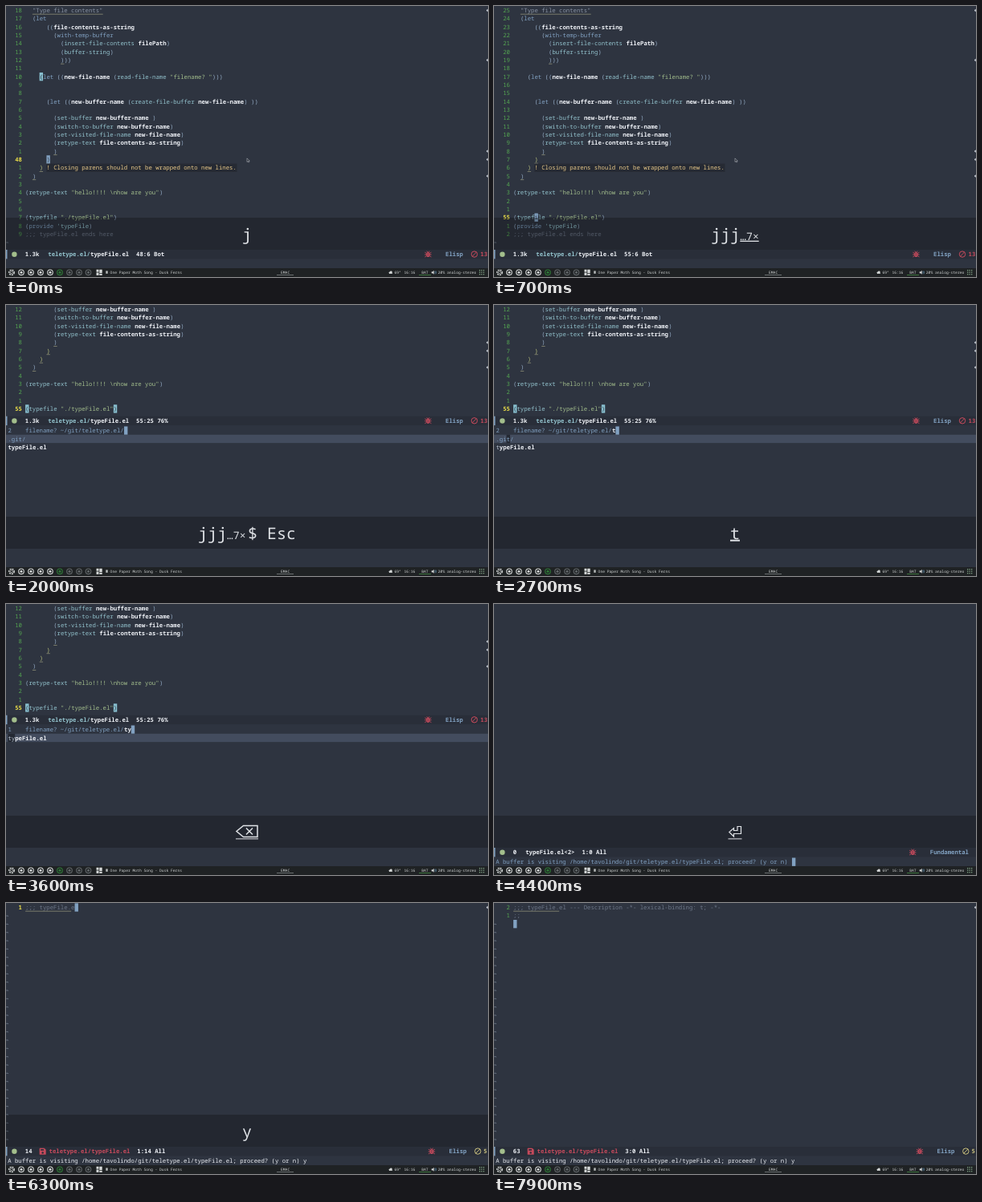
An HTML page that plays this animation: 600x338 px, repeating every 8000 ms.

```html
<!DOCTYPE html>
<html lang="en">
<head>
<meta charset="utf-8">
<title>Retyping a file in the editor</title>
<style>
html, body { margin: 0; width: 100%; height: 100%; overflow: hidden; background: #2e3440; }
svg { display: block; width: 600px; height: 338px; }
text { font-family: "Noto Sans Mono", "DejaVu Sans Mono", monospace; white-space: pre; text-rendering: geometricPrecision; }
</style>
</head>
<body>
<svg id="stage" viewBox="0 0 600 338" xmlns="http://www.w3.org/2000/svg"></svg>
<script>
const LOOP = 8000, CW = 4.39, LH = 10.33, X0 = 24.1, FS = CW / 0.6, ECHO = 321.7;
const C = {
  bg: '#2e3440', bar: '#292e39', blue: '#81a1c1', teal: '#93c3cd', white: '#eceff4',
  green: '#a3be8c', red: '#c64a5c', dim: '#6d7788', num: '#54a551', now: '#e8dc48',
  warn: '#ebcb8b', match: '#88c0d0', sel: '#434c5e', dark: '#242933', line: '#98987c'
};

const CODE = [
  '  "Type file contents"',
  '  (let',
  '      ((file-contents-as-string',
  '        (with-temp-buffer',
  '          (insert-file-contents filePath)',
  '          (buffer-string)',
  '          )))',
  '',
  '    (let ((new-file-name (read-file-name "filename? ")))',
  '', '',
  '      (let ((new-buffer-name (create-file-buffer new-file-name) ))',
  '',
  '        (set-buffer new-buffer-name )',
  '        (switch-to-buffer new-buffer-name)',
  '        (set-visited-file-name new-file-name)',
  '        (retype-text file-contents-as-string)',
  '        )',
  '      )',
  '    )',
  '  )',
  '',
  '(retype-text "hello!!!! \\nhow are you")',
  '', '',
  '(typefile "./typeFile.el")',
  "(provide 'typeFile)",
  ';;; typeFile.el ends here'
];
const FIRST = 30;
const LOOSE = [6, 17, 18, 19, 20];
const FLAGGED = [0, 6, 17, 18, 20];
const HEAD = ';;; typeFile.el --- Description -*- lexical-binding: t; -*-\n;;\n';
const DIR = 'teletype.el/', FILE = 'typeFile.el';
const ASK = 'A buffer is visiting /home/tavolindo/git/teletype.el/typeFile.el; proceed? (y or n) ';

const esc = s => String(s).replace(/&/g, '&amp;').replace(/</g, '&lt;').replace(/>/g, '&gt;');
const rect = (x, y, w, h, fill) => `<rect x="${x}" y="${y}" width="${w}" height="${h}" fill="${fill}"/>`;
const path = (d, stroke, w = 1, fill = 'none') =>
  `<path d="${d}" stroke="${stroke}" stroke-width="${w}" fill="${fill}"/>`;
const ring = (x, y, r, stroke, w = 1, extra = '') =>
  `<circle cx="${x}" cy="${y}" r="${r}" fill="none" stroke="${stroke}" stroke-width="${w}" ${extra}/>`;
const dot = (x, y, r, fill) => `<circle cx="${x}" cy="${y}" r="${r}" fill="${fill}"/>`;
// y is the vertical middle of the row
const text = (x, y, s, fill, weight = 500, size = FS) =>
  `<text x="${x}" y="${y + size * 0.355}" font-size="${size}" font-weight="${weight}" fill="${fill}">${esc(s)}</text>`;
const rowY = r => 5.5 + LH * r;
const colX = c => X0 + CW * c;
const cell = (x, y, fill, n = 1) => rect(x, y - LH / 2, CW * n, LH, fill);
const under = (x, y, n) => rect(x, y + 4.3, CW * n, 0.7, C.line);
const number = (r, n, current) => {
  const s = String(n);
  return text(20 - CW * s.length, rowY(r), s, current ? C.now : C.num, current ? 700 : 500);
};
const block = (x, y, ch, fill) => cell(x, y, fill) + (ch ? text(x, y, ch, C.bg) : '');
const edge = y => path(`M599.6 ${y - 1.4}l-1.6 1.4l1.6 1.4z`, '#dfe3ea', 0.4, '#dfe3ea');
const tilde = r => path(`M0.3 ${rowY(r) + 0.4}q.7-.9 1.4-.2t1.3-.2`, '#7d8a9a', 0.8);

function codeLine(i, y) {
  const s = CODE[i];
  if (i === 0) return text(colX(2), y, s.trim(), '#8993a3') + under(colX(2), y, 20);
  if (s[0] === ';') return text(X0, y, s, C.dim);
  let out = '', prev = '';
  for (const m of s.matchAll(/"[^"]*"|\(+|\)+|[^\s()"]+/g)) {
    const w = m[0];
    let fill = C.white, weight = 700;
    if (w[0] === '"') [fill, weight] = [C.green, 500];
    else if ('()'.includes(w[0])) [fill, weight] = [i === 18 || i === 19 ? '#b5bd7c' : '#92a9c2', 500];
    else if (/^(let|with-temp-buffer|provide)$/.test(w)) [fill, weight] = [C.blue, 500];
    else if (prev === '(' || w[0] === "'") [fill, weight] = [C.teal, 500];
    out += text(colX(m.index), y, w, fill, weight);
    prev = w;
  }
  if (LOOSE.includes(i)) out += under(colX(s.indexOf(')')), y, 1);
  return out;
}

function codeView(top, line, col, cursor) {
  let out = '';
  const cur = line - FIRST;
  const mate = { 18: [8, 4], 19: [1, 2], 25: col === 25 ? [25, 0] : null }[cur];
  for (let i = top; i < (cursor ? CODE.length : 26); i++) {
    const r = i - top, y = rowY(r);
    out += number(r, i === cur ? line : Math.abs(i - cur), i === cur) + codeLine(i, y);
    if (FLAGGED.includes(i)) out += edge(y);
  }
  if (cursor) out += tilde(CODE.length);
  if (mate) out += block(colX(mate[1]), rowY(mate[0] - top), '(', C.match);
  return out + block(colX(col), rowY(cur - top), CODE[cur][col], cursor ? C.blue : C.match);
}

const bug = (x, y) =>
  `<ellipse cx="${x}" cy="${y + 0.4}" rx="2.3" ry="3.1" fill="${C.red}"/>` +
  path(`M${x - 4} ${y - 2.4}l2 1.2M${x + 4} ${y - 2.4}l-2 1.2M${x - 4.2} ${y + 0.4}h8.4M${x - 4} ${y + 3.4}l2-1.2M${x + 4} ${y + 3.4}l-2-1.2M${x - 1.6} ${y - 4}l1 1.4M${x + 1.6} ${y - 4}l-1 1.4`, C.red, 0.9) +
  path(`M${x - 1} ${y - 0.6}h2M${x - 1} ${y + 1.4}h2`, C.bar, 0.6);
const stop = (x, y, fill) =>
  ring(x, y, 3.7, fill, 1) + path(`M${x - 2.6} ${y + 2.6}l5.2-5.2`, fill, 1);

function modeline(y, o) {
  let x = 24 + CW * o.size.length + 10.8;
  let out = rect(0, y - 5.6, 600, 11.4, C.bar) + rect(0, y - 5.6, 1.5, 11.4, C.blue) +
    dot(10.4, y + 0.2, 3.2, C.green) + text(23.8, y, o.size, C.white, 600);
  if (o.unsaved) {
    const d = x - 1.6;
    out += path(`M${d} ${y - 3.6}h5.6l1.8 1.8v5.8h-7.4z`, C.red, 0.6, C.red) +
      rect(d + 1.2, y - 2.6, 3.8, 1.7, C.bar) + dot(d + 3.7, y + 1.9, 1.2, C.bar);
    x += 10;
  }
  if (o.dir) {
    out += text(x, y, o.dir, o.unsaved ? C.red : C.teal, 700);
    x += CW * o.dir.length;
  }
  out += text(x, y, o.file, o.unsaved ? C.red : C.white, 700);
  x += CW * (o.file.length + 2);
  out += text(x, y, o.pos, C.white, 600);
  out += bug(o.modeX - 21.6, y) + text(o.modeX, y, o.mode, C.blue, 700);
  if (o.check === 'busy')
    out += ring(592, y, 3.7, '#7d8797', 0.9) + path(`M592 ${y - 2.2}v2.4l1.8 1`, '#7d8797', 0.8);
  if (o.check === '13') out += stop(583, y, C.red) + text(590.5, y, '13', C.red, 600);
  if (o.check === '5') out += stop(587.3, y, '#c9c07e') + text(594.4, y, '5', '#c9c07e', 600);
  return out;
}

// Key display: a list of [string, size]; the newest one may be underlined
function keyText(parts, mark) {
  const spans = parts.map(([s, size], i) =>
    `<tspan font-size="${size}"${mark && i === parts.length - 1 ? ' text-decoration="underline"' : ''}>${s}</tspan>`);
  return `<text x="300" y="291.7" text-anchor="middle" fill="#dfe2e6">${spans.join('')}</text>`;
}
const ERASE = path('M295.5 276.5H313V290.5H295.5L287 283.5Z M299 279.5l8 8M307 279.5l-8 8', '#dfe2e6', 1.5) +
  rect(286, 292.4, 28, 1, '#dfe2e6');
const ENTER = path('M303 277.5H307.5V286.5H298.5V290L292.8 284.5L298.5 279.5V282.5H303Z', '#dfe2e6', 1.2) +
  rect(291.5, 292.4, 17, 1, '#dfe2e6');

function keys(t) {
  if (t < 2650) {
    const n = Math.max(1, Math.min(7, Math.floor(t / 100)));
    const parts = [['j'.repeat(Math.min(n, 3)), 20]];
    if (n > 3) parts.push([`…${n}×`, 13]);
    if (t >= 800) parts.push(['<tspan dx="2.5">$</tspan>', 20]);
    if (t >= 1300) parts.push([' ', 20], ['Esc', 20]);
    return keyText(parts, t >= 100 && t < 2000);
  }
  if (t < 3450) return keyText([[typed(t), 20]], true);
  if (t < 3750) return ERASE;
  if (t < 4580) return ENTER;
  return keyText([['y', 20]], t < 5200);
}
const typed = t => t < 2650 ? '' : t < 2850 ? 't' : t < 3150 ? 'ty' : t < 3450 ? 'typ' : 'ty';

function picker(t) {
  const q = typed(t), y = rowY(14.63), y1 = y + LH, only = q.length > 1, folder = '~/git/teletype.el/';
  let out = text(2.4, y, only ? '1' : '2', C.blue) + text(X0, y, 'filename? ' + folder, C.blue) +
    text(colX(28), y, q, C.white, 700) + cell(colX(28 + q.length), y, C.blue) +
    rect(0, y1 - LH / 2, 600, LH, C.sel);
  const fileY = only ? y1 : y1 + LH;
  if (only) out += cell(2.4, fileY, C.dark, q.length);
  else {
    if (q) out += cell(2.4 + 3 * CW, y1, C.dark);
    out += text(2.4, y1, '.git/', C.blue);
  }
  return out + text(2.4, fileY, FILE.slice(0, q.length), '#b4bfcd') +
    text(2.4 + CW * q.length, fileY, FILE.slice(q.length), C.white, 600);
}

function count(t) {
  if (t < 7100) return Math.max(0, Math.min(59, Math.floor(14.2 + 0.065 * (t - 6300))));
  return t < 7380 ? 60 : t < 7650 ? 61 : t < 7850 ? 62 : 63;
}

function retyped(n) {
  const rows = HEAD.slice(0, n).split('\n'), last = rows.length - 1;
  let out = '';
  rows.forEach((s, r) => {
    const current = r === last;
    if (!(current && r === 2)) out += number(r, current ? r + 1 : last - r, current);
    out += text(X0, rowY(r), s, C.dim);
  });
  if (n > 2) out += under(X0, rowY(0), Math.min(n, 13));
  for (let r = Math.max(1, rows[last] ? last + 1 : last); r < 29; r++) out += tilde(r);
  return out + edge(5.5) + cell(colX(rows[last].length), rowY(last), C.blue);
}

function statusBar() {
  const y = 332.3, w = '#d6d9d9';
  const small = (x, s, fill = '#cfd2d2') => text(x, y - 0.4, s, fill, 500, 4.667);
  let out = rect(0, 327, 600, 11, '#1f2224');
  out += ring(7, y, 3.2, w, 1.5, 'stroke-dasharray="2 1.05"') + ring(7, y, 1.6, w, 0.7);
  [19, 31, 43, 55, 67, 79, 91, 102.5].forEach((x, i) => {
    const fill = i < 4 ? w : i === 4 ? '#2f7a38' : '#62676a';
    out += ring(x, y, 3.3, fill, 1.1) + dot(x, y, 1.5, fill);
  });
  out += rect(112.5, y - 3.6, 3, 3, w) + rect(112.5, y + 0.2, 3, 3.4, w) +
    rect(116.3, y - 3.6, 3.4, 4.4, w) + rect(116.3, y + 1.5, 3.4, 2.1, w);
  out += rect(124.3, y - 1.9, 2.4, 3.4, '#b8bcbc');
  out += small(129.6, 'One Paper Moth Song - Dusk Ferns') + small(342, 'EMAC') + rect(337, 335, 21, 0.7, '#8d9292');
  out += dot(477.8, y + 0.3, 1.2, w) + dot(479.3, y - 0.5, 1.4, w) + rect(477, y + 0.2, 4, 1.3, w);
  out += small(483.4, '69°') + small(495.4, '16:16') + small(517.2, 'BAT') + rect(514, 335, 15, 0.7, '#4d9b4b');
  out += path(`M529.8 ${y - 0.9}h1.3l1.5-1.3v4.4l-1.5-1.3h-1.3z`, w, 0.2, w) +
    path(`M533.7 ${y - 1.3}q1 1.3 0 2.6M534.8 ${y - 2}q1.5 2 0 4`, '#6fa3c8', 0.6);
  out += small(537.8, '20% analog-stereo');
  for (let i = 0; i < 9; i++)
    out += rect(589 + (i % 3) * 2.5, y - 3.3 + Math.floor(i / 3) * 2.5, 1.3, 1.3, '#7fa184');
  return out;
}
const BASE = rect(0, 0, 600, 338, C.bg), STATUS = statusBar();
const POINTER = path('M300 189.9v4.6l1.1-1l.8 1.5l.8-.4l-.8-1.4h1.4z', '#c9ced6', 0.5, '#20242c');

function editing(t) {
  const split = t >= 2000;
  const line = 48 + Math.min(7, Math.floor(t / 100));
  const col = t >= 800 ? 25 : Math.min(6, Math.max(0, CODE[line - FIRST].length - 1));
  const busy = t >= 1350 && t < 1600;
  let out = codeView(split ? 13 : 0, line, col, !split);
  if (!split) {
    const msg = '! Closing parens should not be wrapped onto new lines.', y = rowY(19);
    out += cell(colX(6), y, '#262a33', msg.length) + text(colX(6), y, msg, C.warn);
    if (t < 1800) out += POINTER;
  } else out += picker(t);
  return out + modeline(split ? 144.3 : 309.6, {
    size: '1.3k', dir: DIR, file: FILE, pos: `${line}:${col} ${split ? '76%' : 'Bot'}`,
    mode: 'Elisp', modeX: busy ? 555.8 : 547, check: busy ? 'busy' : '13'
  }) + (t >= 1350 && !split ? text(2.2, ECHO, 'Quit', C.white) : '');
}

function prompt(answered) {
  return text(2.2, ECHO, ASK + (answered ? 'y' : ''), answered ? C.white : C.blue) +
    (answered ? '' : cell(2.2 + CW * ASK.length, ECHO, C.blue));
}

function scene(t) {
  let out = BASE;
  if (t < 3750) out += editing(t);
  else if (t < 6085) {
    out += modeline(309.6, {
      size: '0', dir: '', file: 'typeFile.el<2>', pos: '1:0 All', mode: 'Fundamental', modeX: 542.8
    }) + prompt(t >= 4580);
  } else {
    const n = count(t), rows = HEAD.slice(0, n).split('\n');
    out += retyped(n) + modeline(309.6, {
      size: String(n), unsaved: true, dir: DIR, file: FILE,
      pos: `${rows.length}:${rows[rows.length - 1].length} All`,
      mode: 'Elisp', modeX: 551.5, check: '5'
    }) + prompt(true);
  }
  if (t < 6850) out += '<rect y="264" width="600" height="40" fill="#000" fill-opacity=".25"/>' + keys(t);
  return out + STATUS;
}

const stage = document.getElementById('stage');
let shown = '', start = null;
function frame(now) {
  if (start === null) start = now;
  const next = scene((now - start) % LOOP);
  if (next !== shown) stage.innerHTML = shown = next;
  requestAnimationFrame(frame);
}
stage.innerHTML = shown = scene(0);
requestAnimationFrame(frame);
</script>
</body>
</html>
```
